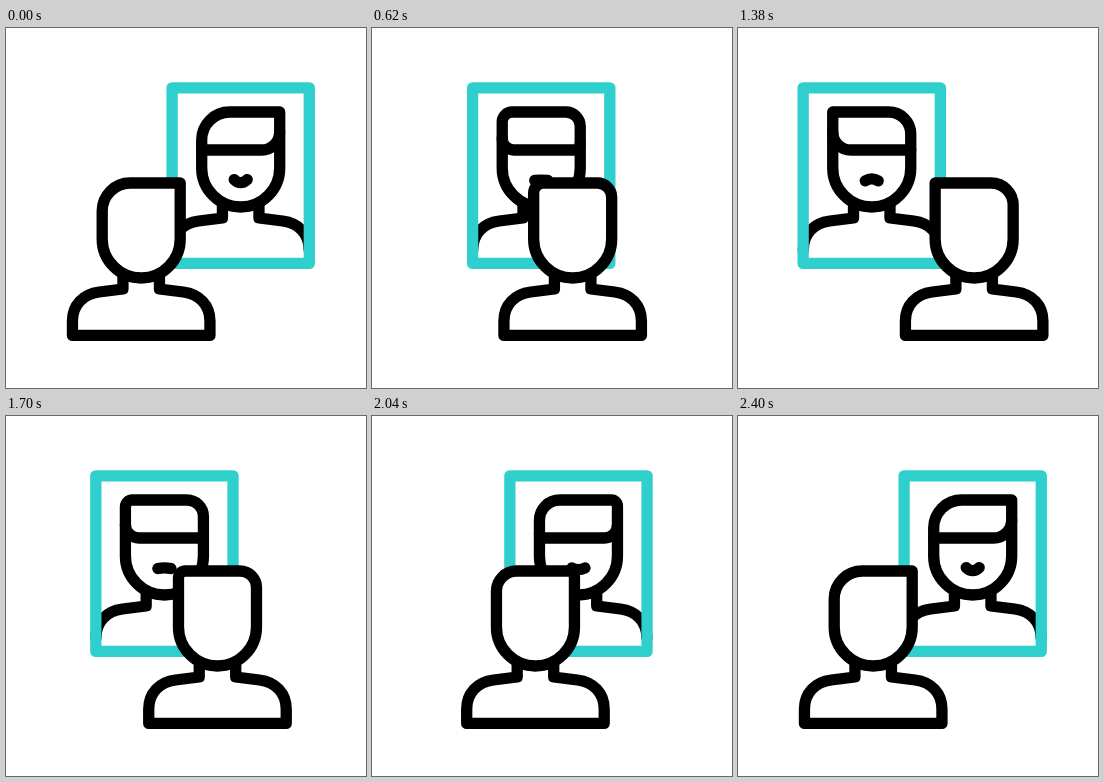
Animation of 360x360 px, one loop 2420 ms. Source, as an HTML page:

```html
<!DOCTYPE html>
<html lang="en">
<head>
<meta charset="utf-8">
<title>Mirror</title>
<style>
  html, body { margin: 0; width: 100%; height: 100%; overflow: hidden; background: #fff; }
  svg { display: block; width: 100vw; height: 100vh; }
  path, rect { fill: #fff; stroke: #000; stroke-width: 11.3; stroke-linecap: round; stroke-linejoin: round; }
  .line { fill: none; }
  .frame { fill: none; stroke: #2fcfce; }
</style>
</head>
<body>
<svg viewBox="0 0 360 360">
  <!-- Figures are drawn around x = 0, the middle of the body -->
  <g id="mirror">
    <path class="line" d="M-68.5 222 C-68.5 206 -58 195 -42 193 L-18.25 190 V177 M18.25 177 V190 L42 193 C58 195 68.5 206 68.5 222"/>
    <path class="head" transform="translate(0 -71)"/>
    <path class="line" id="hair"/>
    <path class="line" id="mouth"/>
    <rect class="frame" x="-68.6" y="59.8" width="137.2" height="175.6"/>
  </g>
  <g id="person">
    <path d="M-18.25 248 V261 L-42 264 C-58 266 -68.75 277 -68.75 293 V307.4 H68.75 V293 C68.75 277 58 266 42 264 L18.25 261 V248"/>
    <path class="head"/>
  </g>
</svg>
<script>
  const LOOP = 2420, STEP = 20;
  const MOVE = 1033, BACK = 1367;
  const TRAVEL = 101;
  const HALF = 39;

  const byId = id => document.getElementById(id);
  const mirror = byId('mirror'), person = byId('person');
  const hair = byId('hair'), mouth = byId('mouth');
  const heads = document.querySelectorAll('.head');

  const mix = (a, b, p) => a + (b - a) * p;
  const clamp = x => Math.min(1, Math.max(0, x));
  const ease = x => x * x * (3 - 2 * x);

  // 0: person on the left, 1: person on the right
  const progress = t => ease(clamp(t / MOVE)) - ease(clamp((t - BACK) / MOVE));

  function headPath(p) {
    const l = mix(28, 0, p), r = mix(0, 22, p);
    return `M${-HALF} 211 V${155 + l} A${l} ${l} 0 0 1 ${l - HALF} 155` +
      ` H${HALF - r} A${r} ${r} 0 0 1 ${HALF} ${155 + r}` +
      ` V211 A${HALF} ${HALF} 0 0 1 ${-HALF} 211 Z`;
  }

  function hairPath(p) {
    const l = mix(0, 18, p), r = mix(18, 0, p);
    return `M${-HALF} ${122 - l} A${l} ${l} 0 0 0 ${l - HALF} 122` +
      ` H${HALF - r} A${r} ${r} 0 0 0 ${HALF} ${122 - r}`;
  }

  function mouthPath(p) {
    const y = mix(151.6, 152.8, p);
    return `M-6.5 ${y} Q0 ${mix(157.6, 149, p)} 6.5 ${y}`;
  }

  function draw(t) {
    const p = progress(t);
    mirror.setAttribute('transform', `translate(${234.7 - TRAVEL * p} 0)`);
    person.setAttribute('transform', `translate(${135.2 + TRAVEL * p} 0)`);
    heads.forEach(h => h.setAttribute('d', headPath(p)));
    hair.setAttribute('d', hairPath(p));
    mouth.setAttribute('d', mouthPath(p));
  }

  const start = performance.now();
  function tick() {
    const t = (performance.now() - start) % LOOP;
    draw(Math.floor(t / STEP) * STEP);
    requestAnimationFrame(tick);
  }
  tick();
</script>
</body>
</html>
```
